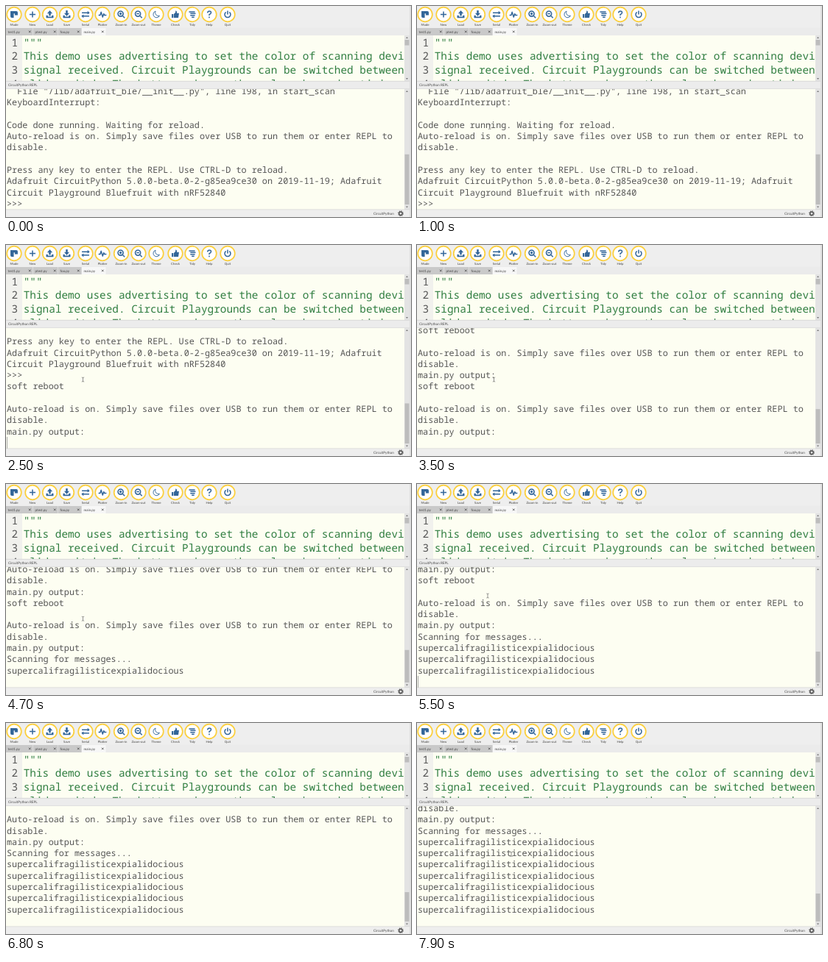
Recreate the animation shown at these times as an HTML page. Size 550 px wide and 287 px high, loop 8 s.

```html
<!DOCTYPE html>
<html lang="en">
<head>
<meta charset="utf-8">
<title>Code editor with serial console</title>
<style>
  html, body { margin: 0; width: 100%; height: 100%; overflow: hidden; background: #eee; }
  svg { display: block; width: 550px; height: 287px; }
  text { white-space: pre; text-rendering: geometricPrecision; }
  .ui { font: 4.6px Lato, sans-serif; fill: #444; }
  .mid { text-anchor: middle; }
  .code, .log { font-family: "Noto Sans Mono", monospace; }
  .code { font-size: 14.36px; fill: #2f7d40; }
  .num { fill: #555; }
  .log { font-size: 11.8px; fill: #555; }
  .icon { fill: none; stroke: #336699; stroke-width: 1.7; stroke-linejoin: round; }
  .icon .solid { fill: #336699; stroke: none; }
</style>
</head>
<body>
<svg id="stage" viewBox="0 0 550 287">
  <defs>
    <clipPath id="editClip"><rect x="0" y="40" width="541" height="62"/></clipPath>
    <clipPath id="logClip"><rect x="0" y="113" width="541" height="164"/></clipPath>
  </defs>
  <rect width="550" height="287" fill="#eee"/>
  <g id="tools"></g>
  <rect y="29.5" width="550" height="10.5" fill="#ebebeb"/>
  <g id="tabs"></g>

  <rect y="40" width="548" height="62" fill="#fdfef2"/>
  <rect y="40" width="22" height="62" fill="#f1f1ed"/>
  <g id="editor" clip-path="url(#editClip)"></g>
  <rect x="541" y="40" width="7" height="62" fill="#e3e3e3"/>
  <rect x="541.5" y="46" width="6" height="7.5" fill="#bdbdbd"/>
  <path d="M543 44l1.5-2 1.5 2zM543 98l1.5 2 1.5-2z" fill="#777"/>

  <rect y="102" width="550" height="11" fill="#ececec"/>
  <path d="M0 102.3H548M0 112.8H548" stroke="#ccc" stroke-width=".6"/>
  <text class="ui" x="3" y="109.4">CircuitPython REPL</text>

  <rect y="113" width="548" height="164" fill="#fdfef2"/>
  <g id="log" clip-path="url(#logClip)"></g>
  <rect id="caret" y="261" width="1" height="16" fill="#aaa"/>
  <rect x="541" y="113" width="7" height="164" fill="#e3e3e3"/>
  <rect id="thumb" x="541.5" width="6" fill="#bdbdbd"/>
  <path d="M543 117l1.5-2 1.5 2zM543 272.5l1.5 2 1.5-2z" fill="#777"/>

  <rect y="277" width="550" height="10" fill="#eee"/>
  <path d="M0 276.8H548" stroke="#ccc" stroke-width=".6"/>
  <path d="M549 0V287" stroke="#d0d0d0" stroke-width="1"/>
  <text class="ui" x="499" y="283.7">CircuitPython</text>
  <g transform="translate(536 282.2)" fill="none" stroke="#555">
    <circle r="2.2" stroke-width="1.5"/>
    <circle r="3.3" stroke-width="1.1" stroke-dasharray="1.3 1.292"/>
  </g>

  <g id="pointer">
    <path id="beam" d="M-1.6-3Q0-3 0-2Q0-3 1.6-3M0-2V2M-1.6 3Q0 3 0 2Q0 3 1.6 3" fill="none" stroke="#777" stroke-width=".8"/>
    <path id="arrow" d="M0 0V8L2 6.2 3.3 9 4.6 8.4 3.4 5.7H6Z" fill="#222" stroke="#fff" stroke-width=".5"/>
  </g>
</svg>
<script>
const $ = id => document.getElementById(id);
const LOOP = 8000, CHAR = 7.08, PITCH = 15.27, BASE = 272.8, ROWS = 11;

function add(parent, tag, attrs, content = '') {
  const node = document.createElementNS('http://www.w3.org/2000/svg', tag);
  for (const key in attrs) node.setAttribute(key, attrs[key]);
  node.textContent = content;
  parent.appendChild(node);
  return node;
}

// Toolbar: label, centre, outline path, filled path
const arrowUp = 'M0-6L4-1.5H1.4V2H-1.4V-1.5H-4Z';
const arrowDown = 'M0 2.5L4-2H1.4V-6H-1.4V-2H-4Z';
const tray = 'M-5.5 1.5H-3V3.2H3V1.5H5.5V5.2H-5.5Z';
const lens = 'M3-1A4 4 0 1 1-5-1A4 4 0 1 1 3-1M2 2L5.2 5.2';
const tools = [
  ['Mode', 11, '', 'M-5.5-5H3.5Q5.5-5 5.5-3V1H1V-1.5H-.5V5H-3.5Q-5.5 5-5.5 3Z'],
  ['New', 36, 'M-4.5 0H4.5M0-4.5V4.5', ''],
  ['Load', 59.5, '', arrowUp + tray],
  ['Save', 82.5, '', arrowDown + tray],
  ['Serial', 108, 'M-5.5-2.5H4M-4 2.5H5.5', 'M3-5.3L6.3-2.5 3 .3ZM-3-.3L-6.3 2.5-3 5.3Z'],
  ['Plotter', 131, 'M-6 1H-3.5L-2-3.5 .3 4 2-1 3 1H6', ''],
  ['Zoom-in', 156.5, lens + 'M-3-1H1M-1-3V1', ''],
  ['Zoom-out', 180, lens + 'M-3-1H1', ''],
  ['Theme', 204, 'M-1-5A5 5 0 1 0 5 2A5 5 0 0 1-1-5Z', ''],
  ['Check', 230, '', 'M-5.5-.5H-3V5H-5.5ZM-2.3-.5L.2-3V-5.5Q2.5-6 2.3-2H5.5L4.5 5H-2.3Z'],
  ['Tidy', 253, 'M-5-4H4M-3-1.3H5M-3 1.4H4M-1 4.1H3', ''],
  ['Help', 276, 'M-2.6-2.3Q-2.3-5 .2-5Q2.8-5 2.8-2.7Q2.8-1 0 .3V1.8M0 3.4V5.2', ''],
  ['Quit', 301, 'M-2.6-3.5A4.4 4.4 0 1 0 2.6-3.5M0-5.5V0', '']
];
for (const [label, x, line, solid] of tools) {
  const g = add($('tools'), 'g', { class: 'icon', transform: `translate(${x} 11.5)` });
  add(g, 'circle', { r: 9.8, style: 'fill:#fff;stroke:#fbcf3c;stroke-width:1.7' });
  const shape = add(g, 'g', { transform: 'scale(.9)' });
  if (line) add(shape, 'path', { d: line, style: label === 'Theme' ? 'stroke-width:1' : '' });
  if (solid) add(shape, 'path', { d: solid, class: 'solid' });
  add($('tools'), 'text', { class: 'ui mid', x, y: 26.6, style: 'font-size:4.3px' }, label);
}

for (const [name, x, width, active] of [
  ['test1.py', 0, 37], ['ptest.py', 37, 34], ['foo.py', 71, 32], ['main.py', 103, 33, true]
]) {
  add($('tabs'), 'rect', { x, y: 30, width: width - .5, height: 10, fill: active ? '#f7f7f7' : '#c9c9c9' });
  add($('tabs'), 'text', { class: 'ui', x: x + 2.5, y: 36.7 }, name);
  add($('tabs'), 'path', { d: `M${x + width - 6} 33.6l2.6 2.6m0-2.6l-2.6 2.6`, stroke: '#444', 'stroke-width': .8 });
}

[
  '"""',
  'This demo uses advertising to set the color of scanning devices',
  'signal received. Circuit Playgrounds can be switched between',
  'slide switch. The buttons change the color when advertising.'
].forEach((line, i) => {
  const y = 54.7 + 18.6 * i;
  add($('editor'), 'text', { class: 'code num', x: 7.5, y }, i + 1);
  add($('editor'), 'text', { class: 'code', x: 23.7, y }, line);
});

const reload = ['Auto-reload is on. Simply save files over USB to run them or enter REPL to', 'disable.'];
const reboot = ['soft reboot', '', ...reload, 'main.py output:'];
const lines = [
  '  File "/lib/adafruit_ble/__init__.py", line 198, in start_scan',
  'KeyboardInterrupt:', '',
  'Code done running. Waiting for reload.', ...reload, '',
  'Press any key to enter the REPL. Use CTRL-D to reload.',
  'Adafruit CircuitPython 5.0.0-beta.0-2-g85ea9ce30 on 2019-11-19; Adafruit',
  'Circuit Playground Bluefruit with nRF52840',
  '>>> ', ...reboot, ...reboot,
  'Scanning for messages...',
  ...Array(7).fill('supercalifragilisticexpialidocious')
];

// Time, index of the bottom row, text on that row
const output = [
  [0, 10, '>>> '], [1700, 12, ''], [2000, 15, 'main.py'], [2500, 16, ''], [3100, 17, ''],
  [3500, 21, ''], [4500, 23, ''], [5000, 24, ''], [5500, 25, ''], [6000, 26, ''],
  [6600, 27, ''], [7100, 28, ''], [7600, 29, '']
];
const caretSpans = [[1200, 2300], [2500, 2900], [4100, 4700], [5200, 6500]];

// Pointer journeys: each a list of time, x, y
const journeys = [
  [[400, 30, 6], [500, 50, 50], [600, 76, 112], [700, 93, 146], [800, 93, 146],
   [1200, 104.5, 183], [4600, 104.5, 183], [4800, 104.5, 183.5], [5100, 104.5, 183],
   [5500, 96, 152], [6000, 57, 82.5], [6300, 43.5, 50], [6400, 43.5, 50], [6600, 22, 4], [6700, 22, 4]],
  [[7300, 30, 15], [7400, 63, 90], [7500, 63, 90], [7900, 128, 178.5], [8000, 128, 178.5]]
];

const rows = Array.from({ length: ROWS }, (_, i) =>
  add($('log'), 'text', { class: 'log', x: 1, y: BASE - PITCH * (ROWS - 1 - i) }));

function pointerAt(t) {
  const path = journeys.find(j => t >= j[0][0] && t < j[j.length - 1][0]);
  if (!path) return null;
  const i = path.findIndex(key => key[0] > t);
  const [t0, x0, y0] = path[i - 1], [t1, x1, y1] = path[i];
  const k = (t - t0) / (t1 - t0);
  return [x0 + (x1 - x0) * k, y0 + (y1 - y0) * k];
}

let shown = -1;
function draw(t) {
  const state = output.filter(o => o[0] <= t).pop();
  const [, bottom, tail] = state;
  if (shown !== bottom) {
    rows.forEach((row, i) => {
      row.textContent = i === ROWS - 1 ? tail : lines[bottom - ROWS + 1 + i];
    });
    const length = 153 * 10.7 / (bottom + 14);
    $('thumb').setAttribute('y', 270 - length);
    $('thumb').setAttribute('height', length);
    shown = bottom;
  }
  $('caret').setAttribute('x', 1 + Math.floor(tail.length * CHAR));
  $('caret').style.display = caretSpans.some(([a, b]) => t >= a && t < b) ? '' : 'none';

  const at = pointerAt(t);
  $('pointer').style.display = at ? '' : 'none';
  if (at) {
    $('pointer').setAttribute('transform', `translate(${at})`);
    $('beam').style.display = at[1] > 40 ? '' : 'none';
    $('arrow').style.display = at[1] > 40 ? 'none' : '';
  }
}

const start = performance.now();
function tick() {
  const t = (performance.now() - start) % LOOP;
  draw(Math.floor(t / 100) * 100);
  requestAnimationFrame(tick);
}
tick();
</script>
</body>
</html>
```
